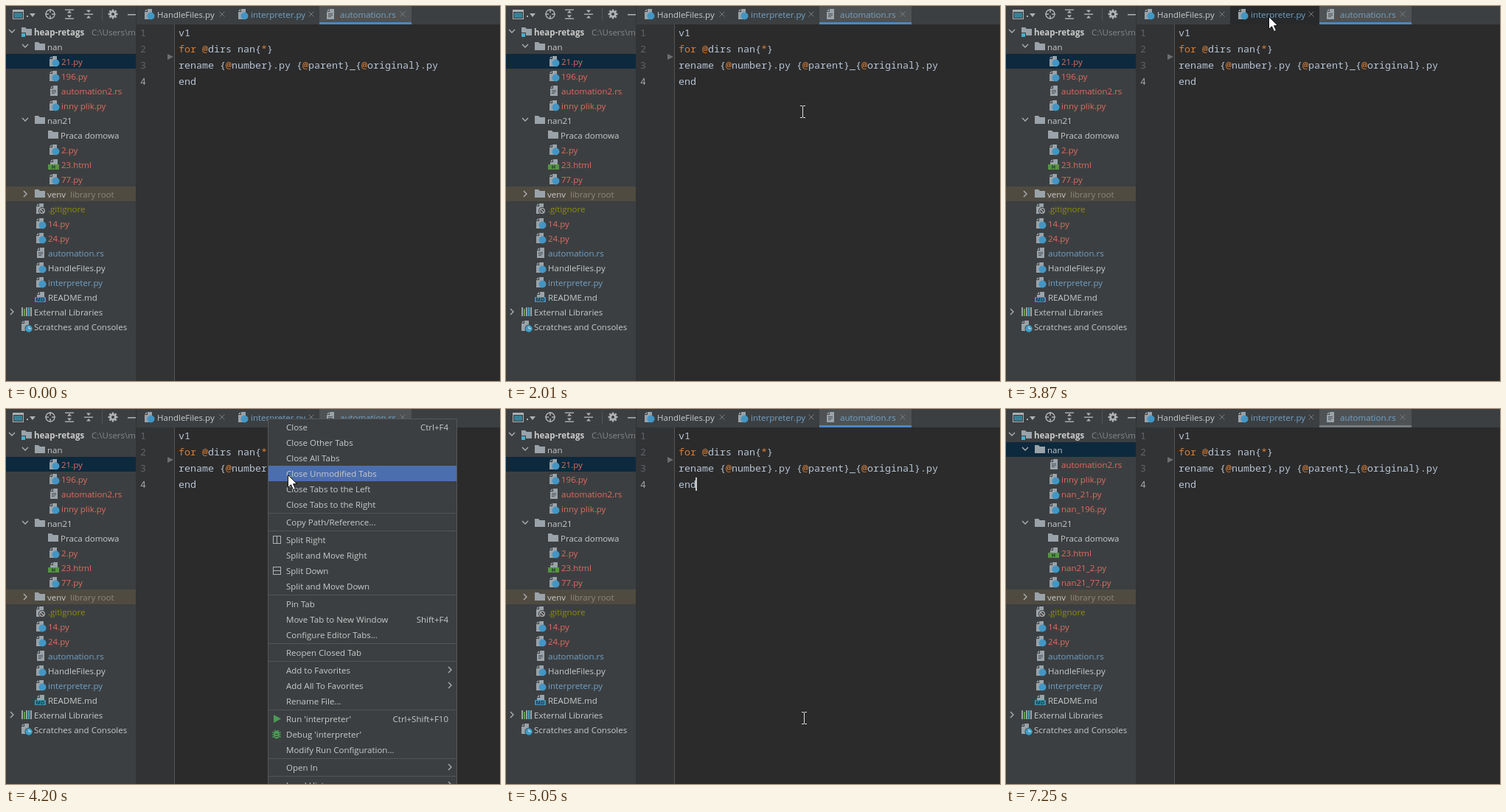
Recreate the animation shown at these times as an HTML page with a canvas. Size 670 by 509 pixels, loop 7430 ms.

```html
<!DOCTYPE html>
<html lang="en">
<head>
<meta charset="utf-8">
<title>Rename script in an editor</title>
<style>
html, body { margin: 0; width: 100%; height: 100%; overflow: hidden; background: #2b2b2b; }
canvas { display: block; }
</style>
</head>
<body>
<canvas id="stage" width="670" height="509"></canvas>
<script>
const g = document.getElementById('stage').getContext('2d');
const LOOP = 7430;
const UI = '11.5px "Open Sans", "Noto Sans", sans-serif';
const BOLD = 'bold ' + UI;
const MONO = '13.33px "Noto Sans Mono", "DejaVu Sans Mono", monospace';
const BADGE = 'bold 7px "Open Sans", sans-serif';
const C = {
  panel: '#3c3f41', text: '#cacaca', red: '#de6d60', blue: '#70a3ca', olive: '#8f8f08',
  dim: '#878787', icon: '#afb1b3', doc: '#9aa3a9', code: '#b6c4d4', key: '#d87d35', accent: '#4a88c7'
};
const CODE = ['v1', 'for @dirs nan{*}', 'rename {@number}.py {@parent}_{@original}.py', 'end'];

// ---------- drawing helpers ----------
function box(x, y, w, h, color) {
  g.fillStyle = color;
  g.fillRect(x, y, w, h);
}
function frame(x, y, w, h, color) {
  g.strokeStyle = color;
  g.lineWidth = 1;
  g.strokeRect(x + .5, y + .5, w - 1, h - 1);
}
function text(s, x, y, color, font = UI, align = 'left') {
  g.font = font;
  g.fillStyle = color;
  g.textAlign = align;
  g.fillText(s, x, y);
}
function trace(pts, close) {
  g.beginPath();
  pts.forEach(([x, y], i) => i ? g.lineTo(x, y) : g.moveTo(x, y));
  if (close) g.closePath();
}
function line(pts, color, width = 1) {
  trace(pts);
  g.strokeStyle = color;
  g.lineWidth = width;
  g.stroke();
}
function poly(pts, color) {
  trace(pts, true);
  g.fillStyle = color;
  g.fill();
}
function disc(x, y, r, color) {
  g.beginPath();
  g.arc(x, y, r, 0, 7);
  g.fillStyle = color;
  g.fill();
}
function ring(x, y, r, color, width) {
  g.beginPath();
  g.arc(x, y, r, 0, 7);
  g.strokeStyle = color;
  g.lineWidth = width;
  g.stroke();
}

// ---------- icons, placed by their centre ----------
function chevron(x, y, down) {
  line(down ? [[x - 4, y - 2], [x, y + 2], [x + 4, y - 2]]
            : [[x - 2, y - 4], [x + 2, y], [x - 2, y + 4]], C.icon, 1.3);
}
function cross(x, y) {
  line([[x - 3.5, y - 3.5], [x + 3.5, y + 3.5]], '#777a7c');
  line([[x + 3.5, y - 3.5], [x - 3.5, y + 3.5]], '#777a7c');
}
function sheet(x, y) {
  poly([[x - 1, y - 7], [x + 5, y - 7], [x + 5, y + 7], [x - 5, y + 7], [x - 5, y - 3], [x - 1, y - 3]], C.doc);
  poly([[x - 5, y - 4], [x - 2, y - 7], [x - 2, y - 4]], C.doc);
}
function badge(x, y, s, color) {
  box(x - 8, y, 15, 7, color);
  text(s, x - .5, y + 6, '#263038', BADGE, 'center');
}
const icons = {
  folder(x, y) {
    poly([[x - 7, y - 6], [x - 2, y - 6], [x, y - 4], [x + 7, y - 4], [x + 7, y + 5], [x - 7, y + 5]], C.doc);
  },
  root(x, y) {
    icons.folder(x, y);
    box(x - 8, y + 1, 7, 7, C.panel);
    box(x - 7, y + 2, 5, 5, '#43b0cf');
  },
  py(x, y) {
    sheet(x - 1, y);
    disc(x + 2.5, y + 2.5, 5, '#4396c4');
  },
  rs(x, y) {
    sheet(x, y);
    for (const dy of [-1, 1, 3]) box(x - 3, y + dy, dy === 3 ? 4 : 6, 1, '#51585c');
  },
  html(x, y) {
    sheet(x, y);
    badge(x, y, 'H', '#55953f');
  },
  md(x, y) {
    sheet(x, y);
    badge(x, y, 'MD', '#3d8fb5');
  },
  ignore(x, y) {
    sheet(x - 1, y);
    disc(x + 2, y + 3, 5, C.panel);
    ring(x + 2, y + 3, 3.3, C.icon, 1.3);
    line([[x, y + 1], [x + 4, y + 5]], C.icon, 1.2);
  },
  libs(x, y) {
    [C.doc, '#62a04b', C.doc, '#43a5c4', C.doc].forEach((c, i) => box(x - 7 + i * 3, y - 6 + (i === 1 ? 2 : 0), 2, i === 1 ? 10 : 12, c));
  },
  scratch(x, y) {
    sheet(x - 2, y - 1);
    disc(x + 3, y + 3, 5.5, C.panel);
    disc(x + 3, y + 3, 4.7, '#3b9fc9');
    line([[x + 3, y], [x + 3, y + 3], [x + 6, y + 3]], '#e0e6e8');
  }
};

// ---------- project panel ----------
function toolbar() {
  box(9, 5, 15, 13, C.icon);
  box(10, 8, 13, 9, C.panel);
  box(11, 9, 11, 7, '#3a7f96');
  box(28, 13, 2, 2, C.icon);
  poly([[32, 10], [40, 10], [36, 15]], C.icon);
  ring(60, 11, 6, C.icon, 1.4);
  for (const [dx, dy] of [[1, 0], [-1, 0], [0, 1], [0, -1]])
    line([[60 + dx * 2, 11 + dy * 2], [60 + dx * 7, 11 + dy * 7]], C.icon, 1.5);
  for (const s of [-1, 1]) {
    box(80, 10.5 + s * 6, 12, 1.4, C.icon);
    poly([[83, 11 + s * 1.5], [89, 11 + s * 1.5], [86, 11 + s * 5]], C.icon);
    poly([[109, 11 + s * 5.5], [115, 11 + s * 5.5], [112, 11 + s * 2]], C.icon);
  }
  box(106, 10.5, 12, 1.4, C.icon);
  box(130, 2, 1, 18, '#515558');
  for (let i = 0; i < 4; i++) {
    const a = i * Math.PI / 4, dx = Math.cos(a) * 6.5, dy = Math.sin(a) * 6.5;
    line([[145 - dx, 11 - dy], [145 + dx, 11 + dy]], C.icon, 2.4);
  }
  disc(145, 11, 4.8, C.icon);
  disc(145, 11, 2, C.panel);
  box(165, 11, 11, 1.5, C.icon);
}
function row(i, icon, x, label, color = C.text) {
  const y = 36 + i * 20;
  icons[icon](x, y - 1);
  text(label, x + 10, y + 4, color, icon === 'root' ? BOLD : UI);
}
function tree(t) {
  const done = t >= 5530;
  const fresh = t >= 6000 ? C.red : C.text;
  box(0, done ? 45 : 65, 176, 20, '#0d293e');
  box(0, 245, 176, 20, '#4f4b41');
  [[8, 34], [26, 54], [26, 154]].forEach(([x, y]) => chevron(x, y, true));
  [[26, 255], [8, 415]].forEach(([x, y]) => chevron(x, y));
  row(0, 'root', 28, 'heap-retags');
  text('C:\\Users\\m', 116, 40, C.dim);
  row(1, 'folder', 46, 'nan');
  const files = done
    ? [['rs', 'automation2.rs'], ['py', 'inny plik.py'], ['py', 'nan_21.py', fresh], ['py', 'nan_196.py', fresh]]
    : [['py', '21.py'], ['py', '196.py'], ['rs', 'automation2.rs'], ['py', 'inny plik.py']];
  files.forEach(([icon, name, c], i) => row(2 + i, icon, 65, name, c || C.red));
  row(6, 'folder', 46, 'nan21');
  row(7, 'folder', 64, 'Praca domowa');
  const more = done
    ? [['html', '23.html'], ['py', 'nan21_2.py', fresh], ['py', 'nan21_77.py', fresh]]
    : [['py', '2.py'], ['html', '23.html'], ['py', '77.py']];
  more.forEach(([icon, name, c], i) => row(8 + i, icon, 65, name, c || C.red));
  row(11, 'folder', 46, 'venv');
  text('library root', 87, 260, '#8c8779');
  row(12, 'ignore', 47, '.gitignore', C.olive);
  row(13, 'py', 47, '14.py', C.red);
  row(14, 'py', 47, '24.py', C.red);
  row(15, 'rs', 47, 'automation.rs', C.blue);
  row(16, 'py', 47, 'HandleFiles.py');
  row(17, 'py', 47, 'interpreter.py', C.blue);
  row(18, 'md', 47, 'README.md');
  row(19, 'libs', 28, 'External Libraries');
  row(20, 'scratch', 28, 'Scratches and Consoles');
}
function panel(t) {
  g.save();
  g.beginPath();
  g.rect(0, 0, 176, 509);
  g.clip();
  box(0, 0, 176, 509, C.panel);
  toolbar();
  tree(t);
  g.restore();
  box(176, 0, 1, 509, '#323232');
}

// ---------- editor ----------
function tabs(t) {
  box(177, 0, 493, 25, C.panel);
  if (t >= 3520 && t < 3900) box(304, 0, 121, 25, '#27292a');
  box(425, 0, 125, 25, '#4e5254');
  box(425, 22, 125, 3, t >= 7250 ? '#747a80' : C.accent);
  icons.py(194, 11);
  text('HandleFiles.py', 205, 15.5, C.text);
  cross(293, 11);
  icons.py(321, 11);
  text('interpreter.py', 332, 15.5, C.blue);
  cross(414, 11);
  icons.rs(440, 11);
  text('automation.rs', 453, 15.5, C.blue);
  cross(538, 11);
}
function caretOn(t) {
  return [[520, 2010], [2520, 3030], [3540, 3770], [4990, 6000], [6510, 7020]]
    .some(([a, b]) => t >= a && t < b);
}
function head(t, p) {
  if (t < 520 || t >= 1240) return [3, 3];
  if (t >= 850) return [0, 0];
  const r = Math.max(0, Math.min(3, Math.floor((p.y - 25) / 22)));
  return [r, Math.max(0, Math.min(CODE[r].length, Math.round((p.x - 234) / 8)))];
}
function editor(t, p) {
  box(177, 25, 493, 484, '#2b2b2b');
  box(177, 25, 51, 484, '#313335');
  box(228, 25, 1, 484, '#555555');
  const [r, c] = head(t, p);
  for (let i = r; i < 4; i++) {
    const x = 234 + (i === r ? c * 8 : 0);
    box(x, 25 + i * 22, (i === 3 ? 258 : 670) - x, 22, '#214283');
  }
  CODE.forEach((s, i) => {
    const y = 41 + i * 22;
    text(i + 1, 182, y, i === r ? '#a4a3a3' : '#606366', MONO);
    // words are drawn run by run to keep the 8px grid
    for (const m of s.matchAll(/for|[@*]|[^@* ]+/g))
      text(m[0], 234 + m.index * 8, y, /^(for|@|\*)$/.test(m[0]) ? C.key : C.code, MONO);
  });
  poly([[219, 65], [227, 69], [219, 73]], '#6c6e70');
  if (caretOn(t)) box(233 + c * 8, 27 + r * 22, 2, 18, '#cccccc');
}

// ---------- context menu ----------
const ITEMS = [
  [25, 'Close', 'Ctrl+F4'], [46, 'Close Other Tabs'], [67, 'Close All Tabs'], [88, 'Close Unmodified Tabs'],
  [109, 'Close Tabs to the Left'], [130, 'Close Tabs to the Right'], [154, 'Copy Path/Reference...'],
  [178, 'Split Right'], [199, 'Split and Move Right'], [220, 'Split Down'], [241, 'Split and Move Down'],
  [265, 'Pin Tab'], [286, 'Move Tab to New Window', 'Shift+F4'], [307, 'Configure Editor Tabs...'],
  [331, 'Reopen Closed Tab'], [355, 'Add to Favorites', '>'], [376, 'Add All To Favorites', '>'],
  [397, 'Rename File...'], [421, "Run 'interpreter'", 'Ctrl+Shift+F10'], [442, "Debug 'interpreter'"],
  [463, 'Modify Run Configuration...'], [487, 'Open In', '>'], [511, 'Local History', '>']
];
function menu(p) {
  box(355, 13, 257, 500, C.panel);
  frame(355, 13, 257, 500, '#555759');
  ITEMS.forEach(([y, label, hint], i) => {
    if (i && y - ITEMS[i - 1][0] > 21) box(356, y - 13, 255, 1, '#515557');
    const hot = p.y > 15 && p.y >= y - 11 && p.y < y + 10;
    if (hot) box(356, y - 11, 255, 21, '#4b6eaf');
    text(label, 380, y + 4, C.text);
    if (hint === '>') chevron(602, y - 1);
    else if (hint) text(hint, 600, y + 4, C.text, UI, 'right');
  });
  frame(362, 172, 11, 11, C.icon);
  box(367, 172, 1, 11, C.icon);
  frame(362, 214, 11, 11, C.icon);
  box(362, 219, 11, 1, C.icon);
  poly([[363, 415], [373, 420.5], [363, 426]], '#499c54');
  for (const dy of [-3, 0, 3]) line([[361, 442 + dy], [373, 442 + dy]], '#499c54', 1.3);
  line([[364, 436], [367, 438], [370, 436]], '#499c54', 1.3);
  g.beginPath();
  g.ellipse(367, 442, 4, 5.5, 0, 0, 7);
  g.fillStyle = '#499c54';
  g.fill();
  box(365, 441, 4, 1, C.panel);
  box(365, 444, 4, 1, C.panel);
}

// ---------- pointer: time, x, y ----------
const PATH = [
  [60, 650, 502], [240, 450, 260], [430, 275, 112], [530, 260, 102], [680, 244, 60], [800, 234, 20],
  [900, 232, 6], [1110, 329, 120], [1410, 329, 120], [1480, 319, 115], [1810, 402, 143], [2010, 402, 143],
  [2150, 370, 155], [2400, 190, 130], [2650, 64, 74], [2800, 73, 83], [2950, 86, 140], [3090, 92, 214],
  [3200, 180, 190], [3350, 335, 85], [3440, 379, 30], [3490, 366, 19], [3590, 356, 14], [4100, 356, 14],
  [4230, 390, 110], [4360, 408, 290], [4480, 402, 391], [4610, 401, 411], [4960, 401, 411],
  [5030, 404, 419], [5320, 404, 419], [5360, 408, 423], [5680, 408, 423], [5720, 409, 420],
  [6670, 409, 420], [6800, 455, 445], [7020, 600, 515]
];
function pointer(t) {
  const i = PATH.findIndex(k => k[0] > t);
  if (i < 1) return { x: 700, y: 600 };
  const a = PATH[i - 1], b = PATH[i], u = (t - a[0]) / (b[0] - a[0]);
  const mix = k => Math.round(a[k] + (b[k] - a[k]) * u);
  return { x: mix(1), y: mix(2) };
}
function arrow({ x, y }) {
  const shape = [[0, 0], [0, 17], [4, 13.3], [7, 20], [10, 18.7], [7, 12.3], [12, 12]].map(([a, b]) => [x + .5 + a, y + .5 + b]);
  poly(shape, '#ffffff');
  g.strokeStyle = '#111111';
  g.lineWidth = 1;
  g.stroke();
}
function beam({ x, y }) {
  box(x, y - 7, 1, 15, '#e0e0e0');
  for (const dy of [-8, 8]) {
    box(x - 3, y + dy, 3, 1, '#e0e0e0');
    box(x + 1, y + dy, 3, 1, '#e0e0e0');
  }
}

function draw(t) {
  const p = pointer(t);
  const open = t >= 3900 && t < 4790;
  const drag = t >= 520 && t < 960;
  panel(t);
  editor(t, p);
  tabs(t);
  if (open) menu(p);
  const inText = p.x > 176 && p.y > 25 && !(t >= 3900 && t < 5000);
  (drag || inText ? beam : arrow)(p);
}
const start = performance.now();
function tick() {
  draw((performance.now() - start) % LOOP);
  requestAnimationFrame(tick);
}
tick();
</script>
</body>
</html>
```
